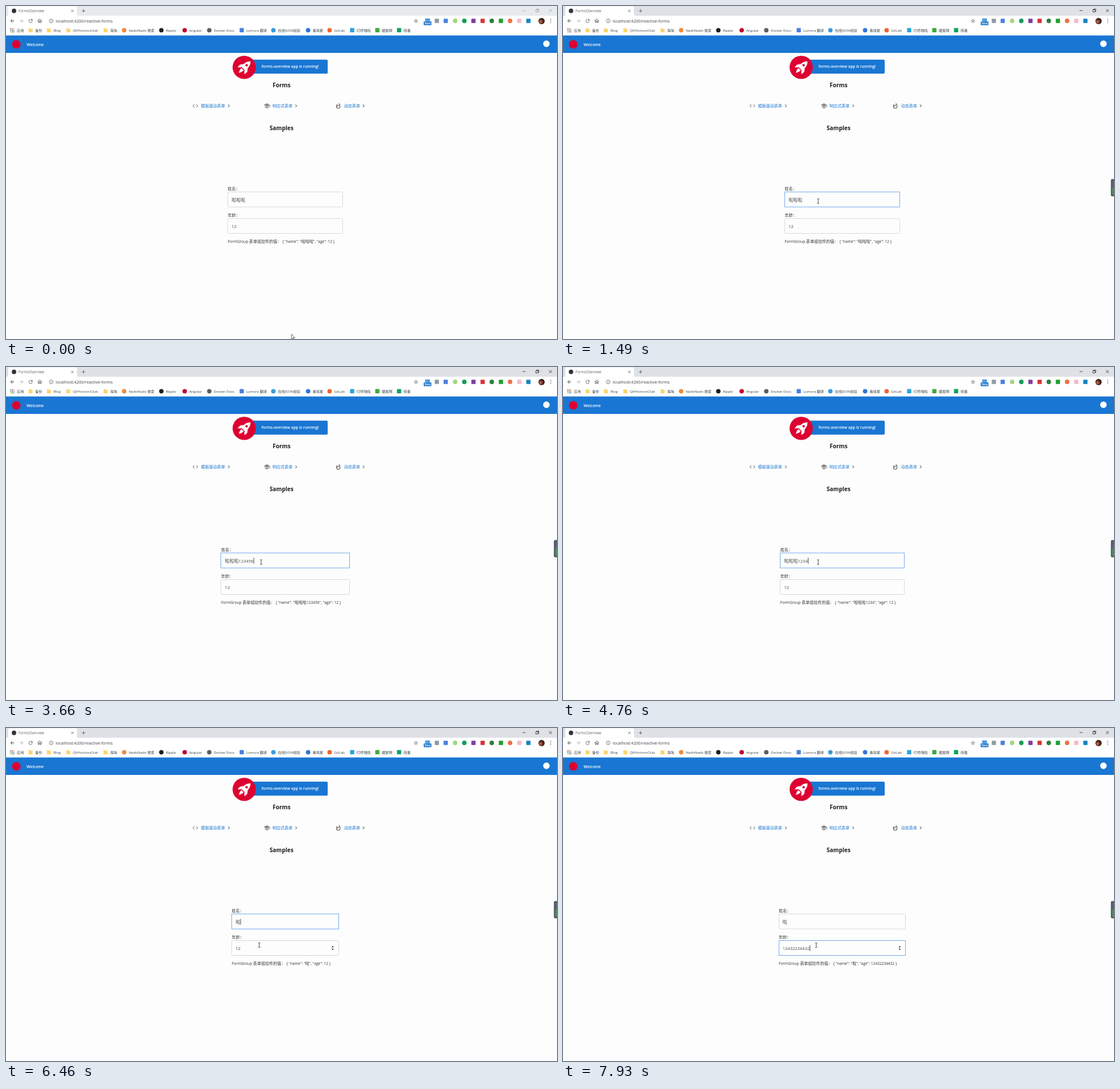
Write an HTML page that moves like this. It is 963x582 px and loops after 8 s.

```html
<!DOCTYPE html>
<html lang="zh-CN">
<head>
<meta charset="utf-8">
<title>FormsOverview</title>
<style>
html, body { margin: 0; width: 100%; height: 100%; overflow: hidden; background: #fdfdfd; }
svg { display: block; width: 963px; height: 582px; }
text { font-family: "Open Sans", "Noto Sans CJK SC", "Noto Sans CJK", sans-serif; white-space: pre; }
</style>
</head>
<body>
<svg id="stage" viewBox="0 0 963 582" xmlns="http://www.w3.org/2000/svg"></svg>
<script>
const stage = document.getElementById('stage');

// ---- drawing helpers ----
const text = (x, y, s, size, fill = '#3c4043', weight = 400) =>
  `<text x="${x}" y="${y}" font-size="${size}" fill="${fill}" font-weight="${weight}">${s}</text>`;
const rect = (x, y, w, h, fill, r = 0) =>
  `<rect x="${x}" y="${y}" width="${w}" height="${h}" rx="${r}" fill="${fill}"/>`;
const dot = (x, y, r, fill) => `<circle cx="${x}" cy="${y}" r="${r}" fill="${fill}"/>`;
const line = (d, color, w = 0.8) => `<path d="${d}" fill="none" stroke="${color}" stroke-width="${w}"/>`;
// 24-unit icon centred on x, y
const icon = (x, y, scale, d, fill) =>
  `<path transform="translate(${x} ${y}) scale(${scale}) translate(-12 -12)" d="${d}" fill="${fill}"/>`;
const folder = x => `<path d="M${x - 3.5} 38.8h2.8l1 1h3.2v6.2h-7z" fill="#f9d56e"/>`;
const square = (x, y, fill) => rect(x - 3.7, y - 3.7, 7.4, 7.4, fill, 0.8);
const disc = (x, y, fill) => dot(x, y, 3.9, fill);
// Latin runs are set slightly smaller than the CJK ones
const mix = (s, size) => s.replace(/[^\u2e80-\uffff]+/g, run => `<tspan font-size="${size * 0.94}">${run}</tspan>`);

const ICONS = {
  back: 'M20 11H7.83l5.59-5.59L12 4l-8 8 8 8 1.41-1.41L7.83 13H20v-2z',
  forward: 'M4 11h12.17l-5.59-5.59L12 4l8 8-8 8-1.41-1.41L16.17 13H4v-2z',
  reload: 'M17.65 6.35A8 8 0 1 0 19.73 14h-2.08A6 6 0 1 1 16.22 7.78L13 11h7V4z',
  home: 'M12 5.69l5 4.5V18h-2v-6H9v6H7v-7.81l5-4.5M12 3L2 12h3v8h6v-6h2v6h6v-8h3z',
  star: 'M22 9.24l-7.19-.62L12 2 9.19 8.63 2 9.24l5.46 4.73L5.82 21 12 17.27 18.18 21l-1.63-7.03zM12 15.4l-3.76 2.27 1-4.28-3.32-2.88 4.38-.38L12 6.1l1.71 4.04 4.38.38-3.32 2.88 1 4.28z',
  code: 'M9.4 16.6L4.8 12l4.6-4.6L8 6l-6 6 6 6zm5.2 0l4.6-4.6-4.6-4.6L16 6l6 6-6 6z',
  school: 'M5 13.18v4L12 21l7-3.82v-4L12 17zM12 3L1 9l11 6 9-4.91V17h2V9z',
  fire: 'M13.5.67s.74 2.65.74 4.8c0 2.06-1.35 3.73-3.41 3.73-2.07 0-3.63-1.67-3.63-3.73l.03-.36C5.21 7.51 4 10.62 4 14a8 8 0 0 0 16 0C20 8.61 17.41 3.8 13.5.67zM11.71 19c-1.78 0-3.22-1.4-3.22-3.14 0-1.62 1.05-2.76 2.81-3.12 1.77-.36 3.6-1.21 4.62-2.58.39 1.29.59 2.65.59 4.04 0 2.65-2.15 4.8-4.8 4.8z',
  chevron: 'M10 6L8.59 7.41 13.17 12l-4.58 4.59L10 18l6-6z'
};

function browser() {
  const ink = '#50545a';
  const marks = [
    [43, folder, '备份'], [75, folder, 'Blog'], [109, folder, 'QVHorizonClub'], [174, folder, '海淘'],
    [206.5, disc, 'NadoNado 搜索', '#ef8a3c'], [271.5, disc, 'Ripplo', '#1b1f23'],
    [312.3, disc, 'Angular', '#c3002f'], [355.3, disc, 'Docker Docs', '#5a5f64'],
    [412, square, 'Lumora 翻译', '#4a80e0'], [467.3, disc, '在线JSON校验', '#3a9bdc'],
    [528, disc, '看球屋', '#2f75d6'], [565.6, disc, 'GitLab', '#f0652f'],
    [605, square, '叮咚啪啦', '#2aa5dc'], [649, square, '暖屋网', '#3fa93c'], [687, square, '砖巢', '#0fa35c']
  ];
  const extensions = [
    [753, square, '#8f9aa5'], [768.5, square, '#4a80e0'], [785, disc, '#a5d67c'], [801, disc, '#0f9d58'],
    [817, square, '#7b3fa0'], [833, square, '#d8323c'], [849, disc, '#2f7d3a'], [865, square, '#1fa02e'],
    [881, disc, '#f0704a'], [897, square, '#f7b9c8'], [913, square, '#1583c4']
  ];
  const grid = ['#e0533f', '#4a80e0', '#3fa95c', '#f0b53c'];
  let s = '<rect id="tabs" width="963" height="17"/>' + rect(0, 17, 963, 34.5, '#fff') +
    '<path d="M2 17q2 0 2-2V3q0-2.5 2.5-2.5h115q2.5 0 2.5 2.5v12q0 2 2 2z" fill="#fff"/>' +
    disc(14, 8.5, '#30343a') + text(22, 11, 'FormsOverview', 6.2, '#5f6368') +
    line('M114 6.5l4 4m0-4l-4 4M132.5 8.5h6m-3-3v6', ink) +
    icon(11, 26, 0.42, ICONS.back, ink) + icon(27, 26, 0.42, ICONS.forward, '#b9bcc0') +
    icon(43, 26, 0.42, ICONS.reload, ink) + icon(59, 26, 0.42, ICONS.home, ink) +
    '<circle cx="79" cy="26" r="3.3" fill="none" stroke="#5f6368" stroke-width=".8"/>' +
    line('M79 25.5v2.3M79 23.8v.8', '#5f6368') +
    text(87, 28.6, 'localhost:4200/reactive-forms', 7.2) +
    icon(716.5, 26, 0.37, ICONS.star, ink) +
    rect(732.5, 21.8, 8.5, 5, '#4d9be0', 0.8) + rect(730, 27, 13.5, 6.5, '#1a73c9', 0.8) +
    text(731.3, 32.3, 'New', 5.2, '#fff', 600);
  for (const [x, draw, color] of extensions) s += draw(x, 26, color);
  s += dot(936, 26.3, 5.5, 'url(#portrait)');
  for (const y of [23, 26, 29]) s += dot(952, y, 0.8, ink);
  for (let i = 0; i < 9; i++) s += rect(7.3 + i % 3 * 2.7, 39 + Math.floor(i / 3) * 2.7, 1.8, 1.8, grid[(i * 3 + 1) % 4]);
  s += text(19, 44.7, '应用', 6.15);
  for (const [x, draw, label, color] of marks) {
    s += (draw === folder ? folder(x) : draw(x, 42.3, color)) + text(x + 7.9, 44.7, label, 6.15);
  }
  return s;
}

function page() {
  const blue = '#1976d2', red = '#dd0031', grey = '#888';
  const links = [
    [331, 'code', 340.7, '模板驱动表单', 389.5],
    [456, 'school', 465.7, '响应式表单', 507],
    [580.7, 'fire', 590.7, '动态表单', 625]
  ];
  let s = rect(0, 51.5, 963, 30.5, blue) + dot(18, 67, 7.5, red) +
    text(36, 69.5, 'Welcome', 6.8, '#fff', 600) + dot(944.5, 66, 5.7, '#fff') +
    rect(416, 93.75, 146.25, 24.5, blue, 2) + dot(416.3, 107.2, 20.3, red) +
    text(446.7, 108, 'forms-overview app is running!', 6.7, '#fff', 600) +
    `<g transform="translate(417 107) rotate(45)" fill="#fff">
      <path d="M0-14.5C5-10 5.8-4 4.5 3.5h-9C-5.8-4-5-10 0-14.5z"/>
      <path d="M-5-3L-9 2.5-8.5 9-4 4.5zM5-3L9 2.5 8.5 9 4 4.5zM-2.8 5h5.6Q3 10 0 14-3 10-2.8 5z"/>
      <circle cy="-5" r="2.2" fill="${red}"/></g>` +
    text(466, 141.5, 'Forms', 10.1, '#1f1f1f', 700) + text(460.8, 216.6, 'Samples', 10, '#1f1f1f', 700);
  for (const [x, name, tx, label, cx] of links) {
    s += icon(x, 174.5, 0.5, ICONS[name], grey) + text(tx, 177.2, label, 7.02, blue) +
      icon(cx, 174.5, 0.46, ICONS.chevron, '#666');
  }
  return s;
}

stage.innerHTML = `<defs><radialGradient id="portrait" cx=".35" cy=".6">
    <stop offset="0" stop-color="#d08a68"/><stop offset=".5" stop-color="#7a3a28"/><stop offset="1" stop-color="#38201c"/>
  </radialGradient></defs>
  ${browser()}
  <path id="controls" d="M902.8 8h5.4M926 6.5h4v4h-4zM927.2 6.5v-1.2h4v4h-1.2M949 5.5l5 5m0-5l-5 5" fill="none" stroke-width=".8"/>
  ${page()}
  <rect id="nameBox" y="325" height="26.2" fill="none"/>
  <rect id="ageBox" y="371.5" height="26" fill="none"/>
  <g id="form">
    ${text(0, 321.7, '姓名：', 7.02, '#333')}${text(0, 367.7, '年龄：', 7.02, '#333')}
    ${text(0, 414, mix('FormGroup 表单组控件的值：', 7.02), 7.02, '#333')}
    <text id="value" x="95.5" y="414" font-size="7.02" fill="#333"></text>
    <text id="name" x="6.7" y="341.9" font-size="8" fill="#4a4a4a"></text>
    <text id="age" x="6.7" y="387.7" font-size="8" fill="#4a4a4a"></text>
    <path id="spin" d="M-2 383.2l2-2.5 2 2.5zM-2 385.8l2 2.5 2-2.5z" fill="#333"/>
    <rect id="caret" width=".8" height="10.5" fill="#222"/>
  </g>
  <g id="widget">${rect(957.6, 302.5, 9, 30, '#4b5461', 2)}${rect(959.7, 305, 4, 25, '#5d6672')}${rect(960.5, 317.5, 1.6, 12.5, '#4fae4c')}</g>
  <path id="arrow" d="M0 0v8.3l1.9-1.7 1.4 3 1.3-.6-1.3-2.9h2.5z" fill="#fff" stroke="#222" stroke-width=".7"/>
  <path id="beam" d="M-2-4h1.3l.7.6.7-.6H2M0-3.4v6.8M-2 4h1.3l.7-.6.7.6H2" fill="none" stroke="#222" stroke-width=".8"/>`;

const el = {};
for (const node of stage.querySelectorAll('[id]')) el[node.id] = node;
const set = (node, attrs) => { for (const k in attrs) node.setAttribute(k, attrs[k]); };
const show = (node, on) => { node.style.display = on ? '' : 'none'; };

// ---- timeline ----
const LOOP = 8000, ACTIVE = 940, NAME_FOCUS = 960, WIDGET = 1030, AGE_FOCUS = 6540, BLINK = 530;
const CENTER = 488;
const nameKeys = [
  [0, '啦啦啦'], [2040, '啦啦啦1'], [2420, '啦啦啦12'], [2730, '啦啦啦123'], [3050, '啦啦啦1234'],
  [3350, '啦啦啦12345'], [3660, '啦啦啦123456'], [4590, '啦啦啦12345'], [4760, '啦啦啦1234'],
  [4910, '啦啦啦123'], [5070, '啦啦啦12'], [5220, '啦啦啦1'], [5600, '啦啦啦'], [5770, '啦啦'], [6000, '啦']
];
const ageKeys = [
  [0, '12'], [7070, '124'], [7160, '1243'], [7240, '12432'], [7530, '1243223'],
  [7700, '12432234'], [7780, '124322344'], [7930, '12432234432']
];
const moves = [
  { from: 100, to: 790, steps: 9, points: [[499, 573.5], [493, 523], [483, 449], [472, 402], [457, 362], [446, 341]] },
  { from: 6150, to: 6450, steps: 4, points: [[446, 341], [445, 350], [443.5, 368], [442.5, 379.5]] }
];

const current = (keys, t) => keys.filter(k => k[0] <= t).pop();

function pointer(t) {
  const { from, to, steps, points } = t < 6150 ? moves[0] : moves[1];
  let p = Math.min(1, Math.max(0, (t - from) / (to - from)));
  p = t < from ? 0 : Math.min(1, (Math.floor(p * steps + 1e-6) + (t < to ? 0.5 : 0)) / steps);
  const last = points.length - 1, i = Math.min(last - 1, Math.floor(p * last)), f = p * last - i;
  return points[i].map((v, k) => v + (points[i + 1][k] - v) * f);
}

function render(t) {
  const [nameTime, name] = current(nameKeys, t), [ageTime, age] = current(ageKeys, t);
  const onAge = t >= AGE_FOCUS, onName = t >= NAME_FOCUS && !onAge;
  const [x, y] = pointer(t);
  const overName = y > 325 && y < 351, overAge = y > 371 && y < 398;

  // the form is centred and as wide as its value line
  const marks = name.split('啦').length - 1, digits = name.length - marks + age.length - 2;
  const half = 100.4 + 1.95 * digits - 3.5 * (3 - marks);
  const left = CENTER - half, edge = Math.floor(left) + 0.5;
  set(el.form, { transform: `translate(${left} 0)` });
  for (const [box, focused] of [[el.nameBox, onName], [el.ageBox, onAge]]) {
    set(box, { x: edge, width: 2 * (CENTER - edge), rx: focused ? 0 : 2, stroke: focused ? '#74aaf0' : '#d9d9d9' });
  }
  el.name.innerHTML = mix(name, 8);
  el.age.innerHTML = mix(age, 8);
  el.value.innerHTML = mix(`{ "name": "${name}", "age": ${age} }`, 7.02);

  const since = onAge ? Math.max(AGE_FOCUS, ageTime) : Math.max(NAME_FOCUS, nameTime);
  show(el.caret, (onName || onAge) && t - since < BLINK && nameTime !== 5600);
  set(el.caret, { x: 7 + (onAge ? el.age : el.name).getComputedTextLength(), y: onAge ? 379.5 : 333.3 });
  show(el.spin, overAge || onAge);
  set(el.spin, { transform: `translate(${half * 2 - 10.5} 0)` });

  set(el.tabs, { fill: t < ACTIVE ? '#e7eaed' : '#dee1e6' });
  set(el.controls, { stroke: t < ACTIVE ? '#9a9da1' : '#222' });
  show(el.widget, t >= WIDGET);
  show(el.beam, overName || overAge);
  show(el.arrow, !overName && !overAge);
  for (const c of [el.beam, el.arrow]) set(c, { transform: `translate(${x} ${y})` });
}

const start = performance.now();
function tick() {
  render((performance.now() - start) % LOOP);
  requestAnimationFrame(tick);
}
tick();
</script>
</body>
</html>
```
